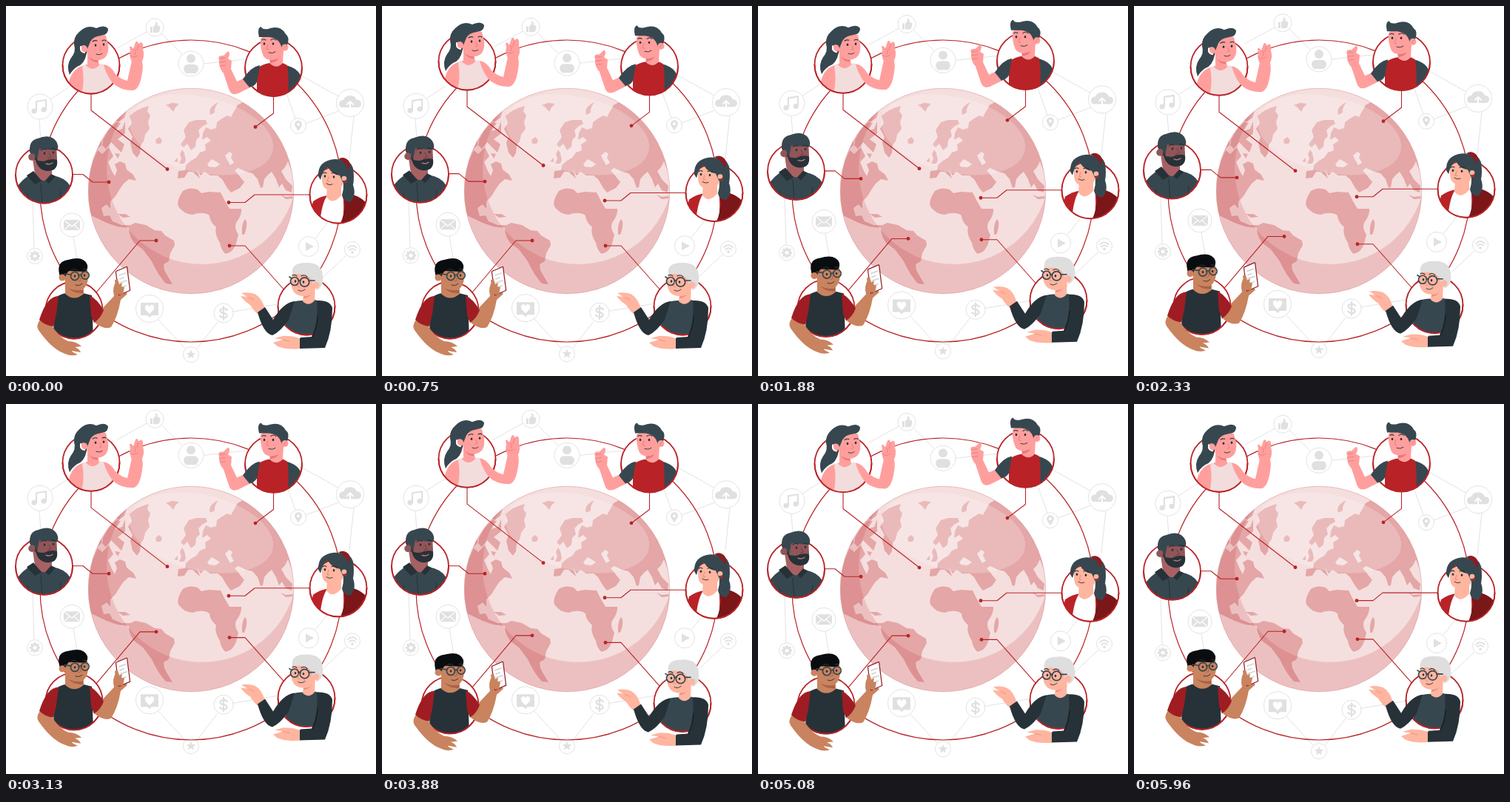
These frames come from a looping animation (500 px wide and 500 px high, 6000 ms). An HTML page:

```html
<!DOCTYPE html>
<html lang="en">
<head>
<meta charset="utf-8">
<title>Connected world</title>
<style>
  html, body { margin: 0; width: 100%; height: 100%; overflow: hidden; background: #fff; }
  svg { display: block; width: 100vw; height: 100vh; }
</style>
</head>
<body>
<svg id="stage" viewBox="0 0 500 500" xmlns="http://www.w3.org/2000/svg"></svg>
<script>
const RED = '#b92327', DARK = '#37474f', INK = '#263238', GREY = '#e0e0e0';
const LOOP = 6000, RISE = 10;

const path = (d, fill) => `<path d="${d}" fill="${fill}"/>`;
const line = (d, color, width = 1) =>
  `<path d="${d}" fill="none" stroke="${color}" stroke-width="${width}" stroke-linecap="round" stroke-linejoin="round"/>`;
const dot = (x, y, r, fill) => `<circle cx="${x}" cy="${y}" r="${r}" fill="${fill}"/>`;
const ring = (x, y, r, color, width, fill = 'none') =>
  `<circle cx="${x}" cy="${y}" r="${r}" fill="${fill}" stroke="${color}" stroke-width="${width}"/>`;

// ---- globe ----
const land = [
  // Greenland, Iceland, Svalbard, Novaya Zemlya, Britain
  'M167 149Q176 139 193 135L191 142 195 148 192 157 194 166 188 174 186 183 182 188 181 199 177 205 171 198 168 185 171 177 165 166 170 158Z',
  'M202 181L207 177 211 181 209 186 203 186Z',
  'M216 134L224 131 234 132 229 137 226 143 221 137Z',
  'M276 147Q272 137 287 130Q281 138 282 144Z',
  'M234 213L237 206 235 200 238 194 241 199 243 208 241 213Z M227 210L232 205 232 211Z',
  // Scandinavia, Eurasia
  'M236 187L243 177 240 168 247 157 257 154 270 154 272 159 265 163 260 168 262 176 257 181 256 190 250 195 245 186 240 191Z',
  'M232 233L233 223 242 222 243 215 250 209 257 205 262 198 270 195 269 187 277 182 272 177 265 181 266 172 270 164 277 167 284 165 285 157 292 152 299 148 304 150 309 141 313 134 320 130A139 139 0 0 1 387 226L381 210 377 218 372 223 378 234 387 243 386 252 378 249 373 240 369 245 365 234 359 224 354 228 349 234 347 245 344 246 340 234 333 226 324 224 314 219 309 222 314 228 322 238 316 246 304 252 299 246 292 234 286 229 276 229 268 224 263 229 258 221 262 233 252 224 246 224 241 232Z',
  // Africa, Madagascar
  'M239 250Q248 244 259 248L264 253 274 251 290 252Q295 263 302 274L318 274Q319 282 311 293Q308 300 314 309L311 321Q307 333 297 335Q291 331 289 320Q281 307 284 299Q275 291 275 283Q266 277 252 282Q240 281 233 271Q230 263 239 250Z',
  'M319 308Q318 295 323 288Q327 291 324 303Q322 312 319 308Z',
  // Americas
  'M118 208L124 195 130 200 139 191 145 203 138 211 143 223 147 230 150 222 147 214 154 210 161 213 163 221 172 228 176 236 166 234 159 240 154 247 148 257 141 264 141 274 136 268 129 273 132 284 140 283 144 291 156 296 168 296 166 300 150 298 136 293 115 283A139 139 0 0 1 118 208Z',
  'M166 297L175 293 189 296 201 303 210 304 215 310 227 317 228 323 222 334 220 345 213 349 214 357 219 366 225 376 216 375Q205 363 197 345L185 329 173 320Q165 309 166 297Z',
  'M151 281L161 281 168 285 158 286Z',
  // Arctic islands
  'M131 181L139 167 149 157 155 158 148 169 157 166 161 156 161 172 151 180 160 187 156 198 149 191 142 184 135 193 130 188Z',
  'M148 154L163 142 160 151 152 157Z M122 194L129 180 129 188Z M147 199L154 200 151 206Z',
  'M371 255L378 258 388 257 387 260 378 261Z'
];
const seas = [
  'M272 214L278 207 285 211 289 214 283 218 274 217Z',
  'M296 202L302 197 306 200 304 205 308 212 303 215 299 208Z'
];
const globe = `
  <clipPath id="earth"><circle cx="250" cy="250" r="139"/></clipPath>
  <g clip-path="url(#earth)">
    ${dot(250, 250, 140, '#f5dede')}
    ${land.map(d => path(d, '#e4a6a6')).join('')}
    ${seas.map(d => path(d, '#f5dede')).join('')}
    <path d="M100 100H400V400H100ZM136 220a129 129 0 1 0 258 0a129 129 0 1 0-258 0Z" fill="${RED}" fill-rule="evenodd" opacity=".155"/>
    <ellipse cx="264" cy="174" rx="99" ry="51" transform="rotate(13 264 174)" fill="#fff" opacity=".22"/>
  </g>
  ${ring(250, 250, 138.7, '#dfa0a0', .6)}`;

// ---- grey icons ----
const badge = (x, y, r, art) =>
  `<g transform="translate(${x} ${y})">${ring(0, 0, r, '#e3e3e3', 1, '#fff')}${art}</g>`;
const g = d => path(d, GREY);
const wires = 'M190 35L150 57M210 37L238 65M267 78L323 72M60 126L86 109M45 153L47 180M449 122L399 94M449 142L405 159M391 152L379 118M470 149L464 206M38 327L36 264M91 312L97 348M418 314L436 291M460 337L428 367M206 424L242 463M258 463L286 427M307 413L368 403';
const gear = Array.from({ length: 8 }, (_, i) =>
  `<rect x="-1.6" y="-7" width="3.2" height="4" fill="${GREY}" transform="rotate(${i * 45})"/>`).join('');
const star = 'M' + Array.from({ length: 10 }, (_, i) => {
  const a = i * Math.PI / 5, r = i % 2 ? 2.9 : 6.6;
  return `${(r * Math.sin(a)).toFixed(2)} ${(-r * Math.cos(a)).toFixed(2)}`;
}).join('L') + 'Z';
const icons = line(wires, '#e3e3e3') +
  badge(201, 29, 12, g('M-6-1H-3V7H-6ZM-2-1L1-4 1-8Q4-8 4-2H7Q8 0 6 6L4 7H-2Z')) +
  badge(250, 78, 17, dot(0, -7, 6, GREY) + g('M-10 8Q-10 1-4 1H4Q10 1 10 8L7 13H-7Z')) +
  badge(46, 136, 17, line('M-5 6V-7L8-9V4', GREY, 2.2) + dot(-8, 6, 3.5, GREY) + dot(5, 4, 3.5, GREY)) +
  badge(465, 131, 18.5, g('M-10 6Q-15 6-15 1Q-14-4-9-4Q-7-10 0-10Q7-10 9-4Q15-4 15 1Q15 6 10 6Z') + line('M0 10V-1M-4 2L0-2 4 2', '#fff', 2)) +
  badge(395, 162, 10.5, g('M0 7Q-5 0-5-2A5 5 0 0 1 5-2Q5 0 0 7Z') + dot(0, -2, 2, '#fff')) +
  badge(89, 296, 16, g('M-11-7H11V7H-11Z') + line('M-11-7L0 2 11-7M-11 7L-3 0M11 7L3 0', '#fff', 1.2)) +
  badge(39, 338, 10.5, gear + ring(0, 0, 3.8, GREY, 2.4)) +
  badge(409, 325, 13.5, g('M-4-6L7 0-4 6Z')) +
  badge(468, 329, 10.5, line('M-6-2Q0-8 6-2M-4 1Q0-3 4 1', GREY, 1.7) + dot(0, 4, 1.8, GREY)) +
  badge(194, 409, 18.5, g('M-12-8H12V9H3L0 12-3 9H-12Z') + path('M0 7L-5 2Q-8-3-4-5Q-1-6 0-2Q1-6 4-5Q8-3 5 2Z', '#fff')) +
  badge(294, 415, 13, line('M5-4Q3-7-1-6Q-6-5-4-2Q-3 0 1 0Q6 2 4 5Q1 8-5 4M0-9V9', GREY, 2.3)) +
  badge(250, 471, 10.5, g(star));

// ---- people ----
const face = (eyes, brows, mouth, ink = INK) =>
  eyes.map(([x, y]) => `<ellipse cx="${x}" cy="${y}" rx="1.3" ry="1.7" fill="${ink}"/>`).join('') +
  line(brows, ink, 1.1) + line(mouth, ink, .9);

// A person: wire to the globe, framed bust, then the parts that leave the frame.
const person = (id, x, y, wire, end, bust, over) => `
  <g id="${id}">
    ${line(wire, RED, 1.1)}${dot(end[0], end[1], 2.4, RED)}
    <clipPath id="${id}Clip"><circle cx="${x}" cy="${y}" r="38.5"/></clipPath>
    ${ring(x, y, 38.5, RED, 1.8, '#fff')}
    <g clip-path="url(#${id}Clip)">${bust}</g>
    ${line(`M${x - 38.5} ${y}A38.5 38.5 0 0 0 ${x + 38.5} ${y}`, RED, 1.8)}
    ${over}
  </g>`;

const pink = '#ff9f9d', rose = '#e8777c', peach = '#ffb5a0', brown = '#915558', tan = '#c9835f';

const waver = person('waver', 115, 80, 'M115 118.5V141L218 220.5', [218, 220.5],
  path('M84 121Q82 91 100 82L112 78 134 80 155 121Z', pink) +
  path('M101 122Q107 104 103 82L107 79Q117 91 128 78L132 79Q137 95 147 104V122Z', '#f3dcdc'),
  path('M99 35Q110 24 122 30Q133 25 137 30Q139 36 133 39L112 45 109 64Q106 79 96 82Q89 87 86 93Q81 80 88 70Q95 62 92 52Q91 42 99 35Z', DARK) +
  path('M132 79Q141 80 148 92Q155 99 164 101L170 74 183 72Q186 80 184 90Q181 112 172 114Q154 114 144 104Q135 92 132 79Z', pink) +
  path('M170 76Q166 66 168 61L167 55Q169 53 172 58L175 49Q178 46 179 51L183 49Q186 51 185 58Q188 68 183 76Z', pink) +
  line('M173 58Q177 61 174 66M179 53L177 60M168 67Q173 71 178 67', rose, .8) +
  path('M110 62L110 81Q118 89 126 79L124 70Z', pink) + path('M112 69Q118 74 124 73L124 76Q116 76 112 69Z', rose) +
  path('M108 44Q122 36 135 40L138 52Q140 70 127 73Q113 75 109 62Z', pink) +
  path('M104 50Q102 33 120 31Q134 25 138 31Q138 38 128 40Q118 41 114 48L110 58 105 60Z', DARK) +
  dot(105, 58, 5, pink) + line('M101 55Q100 62 106 63', '#fff', 2) +
  face([[121, 53], [132, 52]], 'M117 48Q120 46 123 47M130 47Q133 45 135 47', 'M122 65Q127 67 130 64') +
  line('M127 54L129 59 126 60', rose, .9));

const thumbUp = person('thumbUp', 361.5, 83.5, 'M361.5 122V145L337 163.5', [337, 163.5],
  path('M377 80Q399 84 401 104L388 123H372Z', DARK) +
  path('M339 84Q348 78 357 77Q366 83 374 77L380 80Q383 98 381 123H339Z', RED),
  path('M321 98L312 102 303 83 293 88 301 112Q304 122 314 118L336 107Z', pink) +
  path('M343 80Q331 82 320 99L329 110Q340 107 340 98Z', DARK) +
  path('M288 73Q285 66 294 67L299 62Q302 60 302 66L300 71 305 74 304 85 293 90Q287 82 288 73Z', pink) +
  line('M289 71L296 70M289 76L297 75M290 81L297 80', rose, .8) +
  path('M355 66L357 78Q366 86 374 77L375 58Z', pink) + path('M357 73Q366 72 370 66Q368 76 357 77Z', rose) +
  path('M344 44Q352 36 370 43L376 58Q374 68 367 71Q354 76 348 68Q343 57 344 44Z', pink) +
  path('M342 42Q339 29 345 28Q346 32 354 31Q371 25 378 38Q384 42 380 53L374 59 370 50Q366 43 356 42Q348 42 342 42Z', DARK) +
  dot(377, 56, 4.5, pink) + line('M376 58Q376 54 379 54', rose, .8) +
  face([[349, 51], [361, 51]], 'M346 46Q348 44 351 46M358 46Q362 43 365 46', 'M355 63Q360 65 364 62') +
  line('M354 52L352 58 355 59', rose, .9));

const bearded = person('bearded', 51.5, 228, 'M90 227.5H104L117 238H139', [139, 238],
  path('M12 250Q18 236 37 225Q49 236 60 228L71 231Q87 236 91 254L80 270H20Z', DARK) +
  line('M29 254L32 268M74 250L72 266M47 240L49 268', INK, 1),
  path('M35 200L39 227Q50 243 62 231V216Z', '#a86163') +
  path('M37 223L28 229 39 241 48 236ZM61 227L67 230 58 240 53 236Z', INK) +
  path('M38 190L68 186 69 207Q68 222 55 222Q43 221 40 208Z', brown) +
  path('M32 197Q31 181 43 179Q60 172 68 183Q72 190 69 195L45 193 42 208 37 208Z', DARK) +
  dot(35, 204, 4.8, brown) +
  path('M39 202L43 209 51 210Q61 205 69 208Q71 223 56 223Q41 222 39 202Z', INK) +
  line('M54 213Q59 215 63 212', '#b87376', 1.4) +
  face([[52, 199], [64, 198]], 'M47 195Q50 192 54 194M61 193Q64 192 67 194', '') +
  line('M58 199L61 205 57 206', '#6f3c40', .9));

const ponytail = person('ponytail', 449, 255, 'M410.5 255H336L323 265.5H301', [301, 265.5],
  path('M410 285L415 264Q425 257 434 256L456 254Q482 258 488 270L478 296H420Z', RED) +
  path('M424 296Q426 268 434 256L455 254Q458 275 454 296Z', '#fff') +
  path('M455 252Q479 255 488 268L478 296H451Q462 272 455 252Z', '#7b1619'),
  path('M434 244L433 258Q441 270 453 256V240Z', peach) +
  path('M452 207Q464 206 469 219Q471 232 469 242Q474 256 465 265Q456 264 454 256Q459 240 452 222Z', DARK) +
  path('M427 224Q440 216 455 225L457 238Q451 252 440 249Q428 249 427 236Z', peach) +
  path('M422 230Q421 209 444 207Q463 207 461 226L456 240 451 229Q441 228 435 218Q428 221 425 235Z', DARK) +
  path('M449 207Q456 202 463 209Q467 215 463 221Q458 209 449 207Z', '#8d1b20') +
  dot(457, 233, 3.3, peach) + dot(459, 237, 1.8, RED) +
  face([[431, 230], [443, 231]], 'M428 226Q431 224 433 226M440 226Q444 224 447 227', 'M433 240Q437 243 441 241') +
  line('M436 231L434 237 437 237', '#e48670', .9));

const phone = person('phone', 92, 411, 'M122 387L181 317H203', [203, 317],
  path('M65 395Q74 389 81 388Q92 396 104 388L116 391 118 452H64Z', INK),
  path('M46 424Q40 432 44 438Q62 464 80 470Q88 474 97 471Q88 467 89 466L101 468Q99 463 93 461L102 460Q95 453 84 453Q72 448 62 432Z', tan) +
  path('M71 392Q55 392 45 424Q53 432 64 433L68 416Z', '#9f1d22') +
  path('M129 410L146 392Q143 380 149 372L164 389 155 397Q151 420 142 434Q133 438 120 428Z', tan) +
  path('M113 391Q123 396 132 411Q128 422 119 428L115 418Z', '#9f1d22') +
  line('M149 359L163 353 167 384 153 390Z', '#8e1a1f', 2.4) +
  path('M149 359L163 353 167 384 153 390Z', '#fff') +
  line('M153 364L161 361M154 369L159 367M154 374L163 371M156 381L162 378', '#d5d5d5', 1.8) +
  path('M147 370L151 369 153 376 157 374 156 379 160 380 158 390 149 389Z', tan) +
  path('M80 372L80 389Q92 400 105 389V378Z', tan) + path('M84 380Q91 385 104 384L104 388Q90 389 84 380Z', '#a96345') +
  path('M78 356L106 352Q112 356 111 368Q109 384 98 384Q84 385 80 374Z', tan) +
  path('M72 362Q68 345 84 343Q105 337 110 350Q111 356 107 359L85 358Q81 361 79 370L74 370Z', '#090d10') +
  dot(76, 367, 4.5, tan) +
  ring(93, 365, 5.6, DARK, 1.7) + ring(107, 364, 5.2, DARK, 1.7) + line('M79 362L88 363M98 364L102 363', DARK, 1.7) +
  face([[93, 365], [106, 364]], 'M88 357Q92 354 96 357M104 356Q107 354 109 357', 'M94 377Q99 379 103 375') +
  line('M100 365L101 371 98 372', '#a96345', .9));

const elder = person('elder', 406, 406, 'M378 386L323 324H302', [302, 324],
  path('M378 404Q390 397 402 398Q409 402 417 397L428 400 424 448H378Z', DARK),
  path('M420 398Q438 397 441 408Q441 440 431 462L396 463Q394 453 398 448L413 447Q423 425 420 398Z', INK) +
  line('M414 447Q420 437 421 420', '#11191d', 1) +
  path('M350 410Q346 394 336 389Q327 386 318 388L326 393 317 392Q322 399 330 404Q335 412 340 416Z', peach) +
  path('M390 399Q374 401 361 424L350 407 340 414Q348 443 360 445Q371 440 382 424Z', INK) +
  path('M397 449Q386 445 374 446L363 449 374 451 361 455 367 460Q380 465 397 463Z', peach) +
  line('M328 394L335 397M374 451L383 453', '#e78f7d', .8) +
  path('M402 387L401 399Q409 407 417 398L418 376Z', peach) + path('M403 391Q410 390 414 384Q412 394 402 395Z', '#e78f7d') +
  path('M387 362Q398 356 412 364L418 377Q414 394 402 392Q386 392 385 373Z', peach) +
  path('M387 363Q384 347 405 347Q427 346 428 365Q430 379 420 384L415 377Q414 368 408 365Q398 360 387 363Z', '#dedede') +
  dot(419, 377, 4.5, peach) +
  ring(390, 372, 5.5, DARK, 1.7) + ring(403.5, 373, 6.2, DARK, 1.7) + line('M383 366L386 368M409 371L417 371M395 371L398 371', DARK, 1.7) +
  face([[391, 372], [402, 373]], 'M387 364Q390 362 393 365M399 365Q404 362 407 366', 'M395 384Q399 387 404 383') +
  line('M396 373L394 379 397 380', '#e78f7d', .9));

document.getElementById('stage').innerHTML =
  `<g id="icons">${icons}</g>${globe}${ring(250, 250, 204, RED, 1.2)}` +
  waver + thumbUp + bearded + ponytail + phone + elder;

// ---- floating: [id, period, delay] in ms ----
const floats = [
  ['icons', 6000, 500],
  ['waver', 3000, -500],
  ['thumbUp', 3000, 500],
  ['bearded', 6000, 500],
  ['ponytail', 6000, -500],
  ['phone', 3000, 1500],
  ['elder', 1500, 1000]
].map(([id, period, delay]) => ({ node: document.getElementById(id), period, delay }));

// Straight up by RISE and back down; resting until the delay has passed.
function lift(t, period, delay) {
  if (t < delay) return 0;
  const k = (t - delay) % period / period;
  return -RISE * (1 - Math.abs(1 - 2 * k));
}

function draw() {
  const t = performance.now() % LOOP;
  for (const { node, period, delay } of floats) {
    const y = lift(t, period, delay) - lift(0, period, delay);
    node.setAttribute('transform', `translate(0 ${y.toFixed(3)})`);
  }
  requestAnimationFrame(draw);
}
draw();
</script>
</body>
</html>
```
